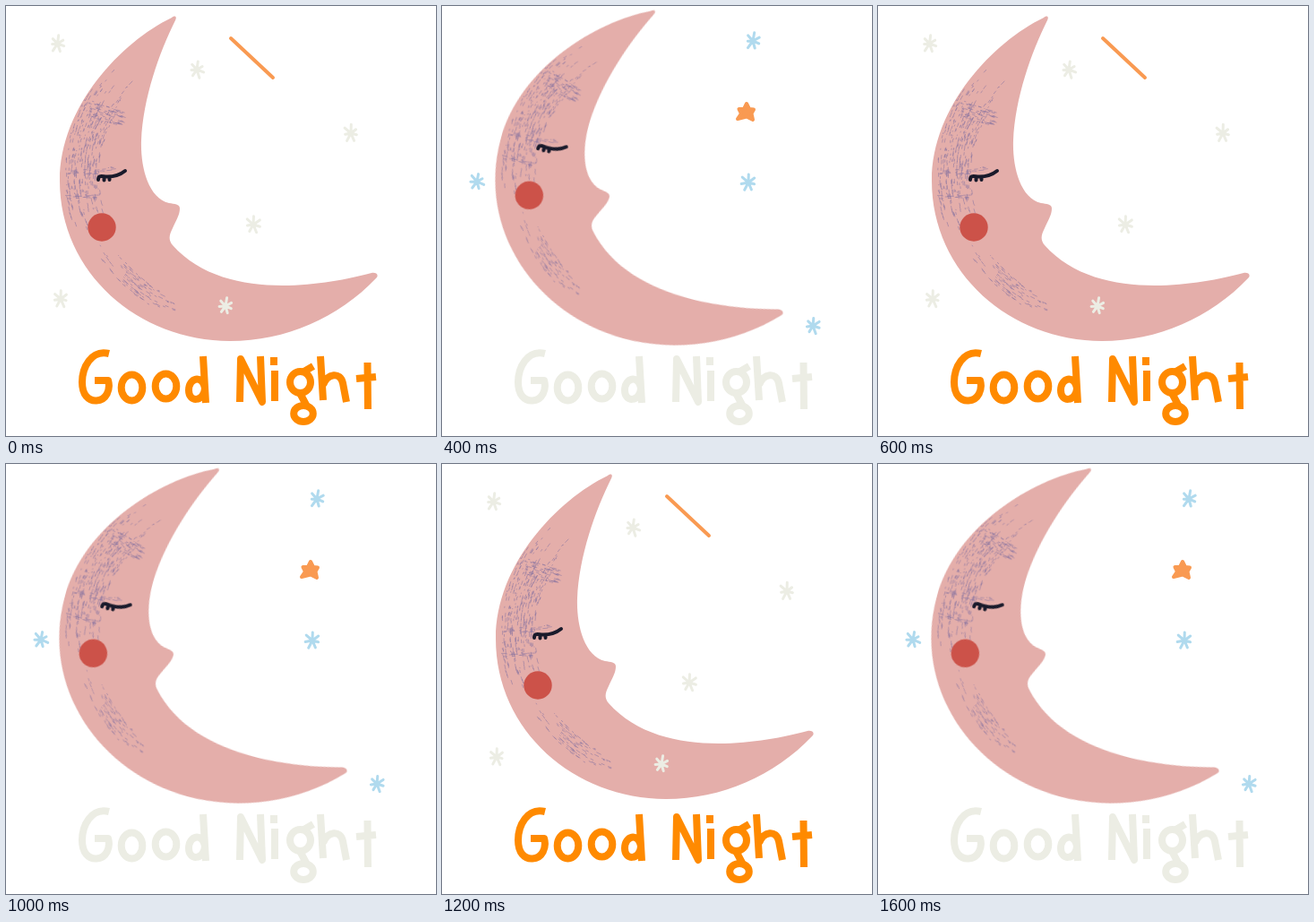
Write an HTML page that moves like this. It is 480 by 480 pixels and loops after 1.8 s.

```html
<!DOCTYPE html>
<html lang="en">
<head>
<meta charset="utf-8">
<title>Good Night</title>
<style>
  html, body { margin: 0; width: 100%; height: 100%; overflow: hidden; background: #fff; }
  svg { display: block; width: 100vw; height: 100vh; }
  path { stroke-linejoin: round; }
  #eye, #sky { stroke-linecap: round; }
  #moon { transform-origin: 237.5px 192.5px; }
  #words { transform-origin: 247px 425.5px; fill: none; stroke: currentColor; stroke-width: 8; }
</style>
</head>
<body>
<svg viewBox="0 0 480 480" role="img" aria-label="Good Night">
  <defs>
    <path id="body" d="M185 13C129 40 60 112 60 195C60 298 148 374 250 374C312 374 371 348 413 304
      C417 300 413 297 408 298C352 313 242 330 186 267C181 261 182 256 186 248C190 239 194 233 194 226
      C194 221 188 221 182 220C158 214 150 178 151 150C153 103 171 52 189 16C191 12 189 10 185 13Z"/>
    <clipPath id="inside"><use href="#body"/></clipPath>
  </defs>

  <g id="moon">
    <use href="#body" fill="#e4aeaa"/>
    <path id="scratches" clip-path="url(#inside)" fill="none" stroke="#8a76a0" stroke-width=".8" opacity=".7"/>
    <circle cx="107" cy="247" r="15.7" fill="#cc5249"/>
    <path id="eye" d="M103 194C103 189 106 190 111 190.500C120 191 128 188 133 184M109.500 191V194.500M115.500 191V194"
      fill="none" stroke="#191a2b" stroke-width="4"/>
  </g>

  <g id="sky"></g>

  <g id="words">
    <path d="M115 388C95 383 85 404 85 420C85 434 92 441 101 440.500C112 440 117 428 114 418L99 418"/>
    <ellipse cx="140.500" cy="426" rx="11.800" ry="14.500"/>
    <ellipse cx="178.500" cy="424.500" rx="11.800" ry="14"/>
    <path d="M220 391L223 443M222 427C219 411 204 415 204 429C204 443 221 442 222 427"/>
    <path d="M261 442L262 394L286 442L284 391"/>
    <path d="M299 392V401M300 407V441"/>
    <ellipse cx="328.500" cy="420" rx="11.500" ry="12"/>
    <path d="M331 409L343 402M328 432L336 447"/>
    <ellipse cx="332" cy="455" rx="10.800" ry="9"/>
    <path d="M351 391L354 440M354 423C359 410 373 408 376 421L380 442"/>
    <path d="M403.500 398L404 450M391 416L413 414"/>
  </g>
</svg>
<script>
const STEP = 200, COUNT = 3, TAU = Math.PI * 2;
const $ = id => document.getElementById(id);

let seed = 11;
const rand = () => (seed = seed * 16807 % 2147483647) / 2147483647;
const between = (a, b) => a + (b - a) * rand();

// Holds each value for one step, then cuts to the next.
function hold(el, prop, values) {
  const frames = [...values, values[0]].map((v, i) => (
    { [prop]: v, offset: i / COUNT, easing: 'step-end' }));
  el.animate(frames, { duration: STEP * COUNT, iterations: Infinity });
}

function add(parent, tag, attrs) {
  const el = document.createElementNS('http://www.w3.org/2000/svg', tag);
  for (const k in attrs) el.setAttribute(k, attrs[k]);
  return parent.appendChild(el);
}

// A line from a point, by direction and length.
const line = (x, y, angle, len) =>
  `M${x.toFixed(1)} ${y.toFixed(1)}l${(Math.cos(angle) * len).toFixed(1)} ${(Math.sin(angle) * len).toFixed(1)}`;

// Broken strands that follow the moon's outer rim; angles in turns.
function rimStrands(count, radius, from, to, specks) {
  let d = '';
  for (let i = 0; i < count; i++) {
    const r = radius + i * 3, a = from + between(-.03, .03), b = to + between(-.03, .03);
    for (let j = 0; j < specks; j++) {
      const t = between(a, b) * TAU, q = r + between(-1, 1);
      d += line(245 + Math.cos(t) * q, 190 + Math.sin(t) * q, t + TAU / 4, between(1, 6));
    }
  }
  return d;
}

// A patch of short strokes across the rim strands.
function patch(x, y, w, h, slope, specks) {
  let d = '';
  for (let i = 0; i < specks; i++) {
    const dx = between(-w, w);
    d += line(x + dx, y + dx * slope + between(-h, h), Math.atan(slope), between(1, 6));
  }
  return d;
}

$('scratches').setAttribute('d',
  rimStrands(13, 142, .455, .595, 32) +
  rimStrands(7, 148, .31, .40, 18) +
  patch(112, 120, 20, 9, .3, 70) +
  patch(92, 185, 26, 3, -.1, 25) +
  patch(84, 213, 18, 2, 0, 20));

// Uneven rays, longest near the vertical.
function star(x, y, rays) {
  const tilt = -TAU / 4 + between(-.05, .2);
  let d = '';
  for (let i = 0; i < rays; i++) {
    const a = tilt + i * TAU / rays;
    d += line(x, y, a, 6.5 + 2.5 * Math.abs(Math.sin(a)) + between(-1, 1));
  }
  return d;
}

// One sky per step: star centres and the shooting star's path.
const skies = [
  { color: '#ecede4', rays: 7, width: 3, comet: 'M251 36L298 80',
    stars: [[57.5, 42], [213, 71], [385, 142], [276, 244], [61, 327], [245, 335]] },
  { color: '#fccb1c', rays: 5, width: 4, comet: 'M309.500 88L320 98.500',
    stars: [[127, 91], [281, 143], [171, 314]] },
  { color: '#b0daee', rays: 7, width: 3,
    comet: 'M340 109L343 115L348 115.500L345.500 120L347 127L340 123.500L330 126L334 120L331.500 115L337 115Z',
    stars: [[39, 196], [347, 39], [342, 197], [414, 357]] }
];
skies.forEach((sky, step) => {
  const g = add($('sky'), 'g', { fill: 'none' });
  for (const [x, y] of sky.stars)
    add(g, 'path', { d: star(x, y, sky.rays), stroke: sky.color, 'stroke-width': sky.width });
  add(g, 'path', { d: sky.comet, stroke: '#f99a52', fill: '#f99a52', 'stroke-width': 4 });
  hold(g, 'visibility', skies.map((_, i) => i === step ? 'visible' : 'hidden'));
});

hold($('moon'), 'transform', ['rotate(0deg)', 'rotate(-15deg)', 'rotate(15deg)']);
hold($('words'), 'transform', ['rotate(0deg)', 'rotate(-6.7deg)', 'rotate(0deg)']);
hold($('words'), 'color', ['#ff8a00', '#fb6249', '#ecede4']);
</script>
</body>
</html>
```
